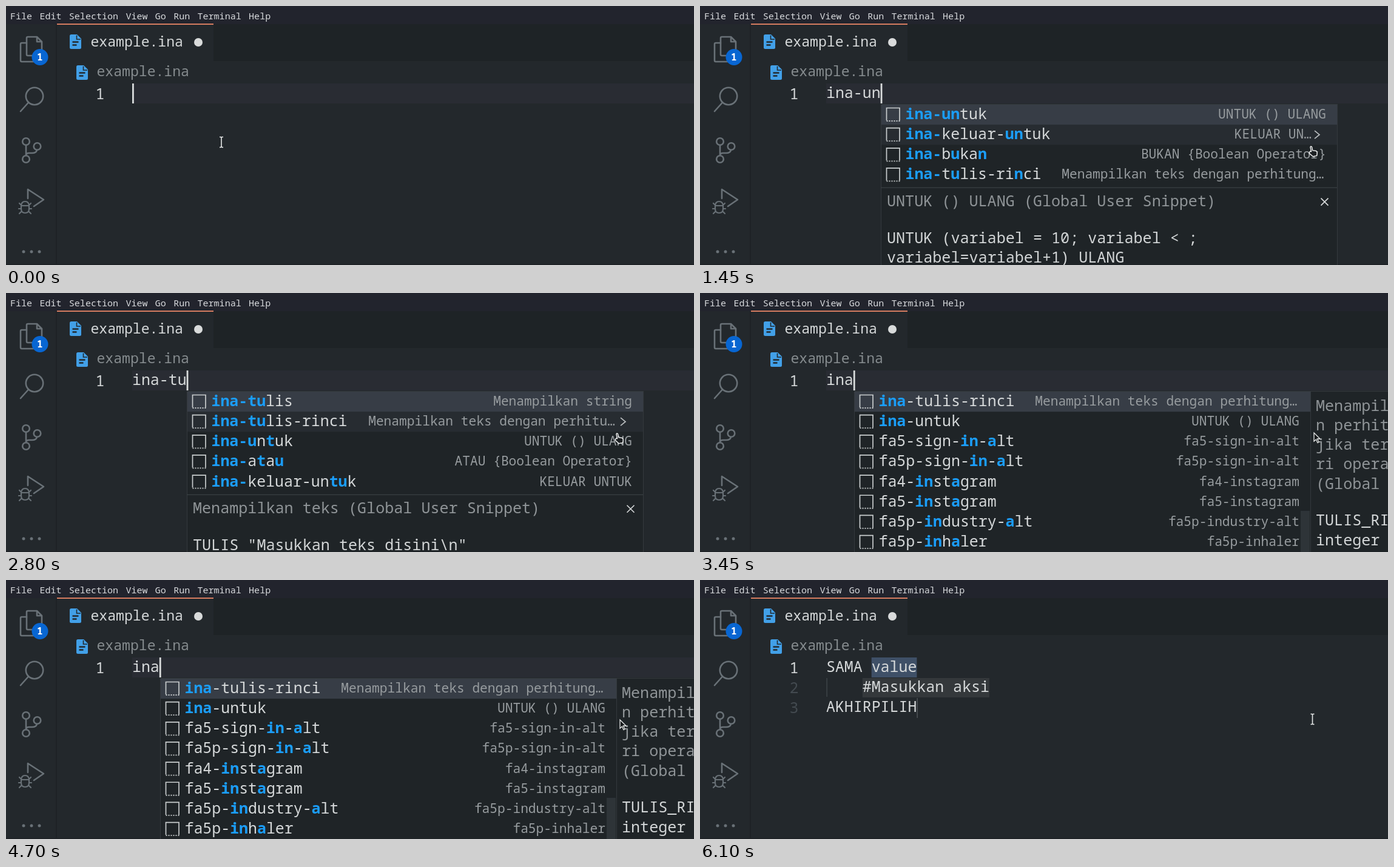
An HTML page that plays this animation: 1134 px wide and 428 px high, repeating every 6.15 s.

```html
<!DOCTYPE html>
<html lang="en">
<head>
<meta charset="utf-8">
<title>Snippet typing</title>
<style>
  html, body { margin: 0; width: 100%; height: 100%; overflow: hidden; background: #23282c; }
  svg { display: block; width: 1134px; height: 428px; }
  text { font-family: "Noto Sans Mono", "DejaVu Sans Mono", monospace; white-space: pre; fill: #d5d8d9; }
  .menu { font-size: 15.05px; fill: #d8dadd; }
  .tab { font-size: 23.1px; }
  .code, .label { font-size: 24.9px; }
  .detail { font-size: 21.2px; fill: #979c9f; }
  .head { font-size: 25.1px; fill: #8f9497; }
  .doc { font-size: 25.1px; fill: #d2d5d6; }
  .hit { font-weight: 700; fill: #1b9df8; }
  .icon { fill: none; stroke: #697177; stroke-width: 2.6; stroke-linejoin: round; stroke-linecap: round; }
  .scene { visibility: hidden; }
  .scene.on { visibility: visible; }
</style>
</head>
<body>
<svg viewBox="0 0 1134 428">
  <defs>
    <g id="file">
      <path d="M2.5 0H12L19 7V21.5Q19 24 16.5 24H2.5Q0 24 0 21.5V2.5Q0 0 2.5 0Z" fill="#42a0e8"/>
      <path d="M4.5 12.5H14.5M4.5 17.5H11.5" stroke="#23282c" stroke-width="2.4"/>
      <path d="M11.5 1.5V8H18" fill="none" stroke="#23282c" stroke-width="1.6"/>
    </g>
  </defs>

  <rect width="1134" height="428" fill="#23282c"/>
  <rect width="1134" height="30" fill="#22242d"/>
  <rect x="342" y="30" width="792" height="61" fill="#1e2326"/>
  <rect x="82" y="30" width="2" height="398" fill="#1e2226"/>
  <rect y="426" width="1134" height="2" fill="#1e2226"/>
  <rect x="84" y="29" width="258" height="2" fill="#d67c60"/>
  <g id="menu"></g>

  <use href="#file" x="105" y="47"/>
  <text class="tab" x="139.5" y="67">example.ina</text>
  <circle cx="317" cy="60" r="7" fill="#d9dbdb"/>
  <use href="#file" x="116" y="98"/>
  <text class="tab" x="149.5" y="116" style="fill:#858b8e">example.ina</text>

  <g class="icon">
    <path d="M34 61H26Q24 61 24 63V90Q24 92 26 92H46Q48 92 48 90V82"/>
    <path d="M36 51H51L59 59V80Q59 82 57 82H36Q34 82 34 80V53Q34 51 36 51ZM51 51V59H59"/>
    <circle cx="47" cy="149" r="14.2"/><path d="M37 159.5L24 174"/>
    <circle cx="33" cy="224" r="5.8"/><circle cx="51.5" cy="232" r="5.8"/><circle cx="33" cy="253" r="5.8"/>
    <path d="M33 230V247M51 238Q50 243 43 243H38Q33 243 33 247"/>
    <path d="M36 318V303L62 320L46 331"/>
    <path d="M25 331Q25 323 31.5 323T38 331V335Q38 342 31.5 342T25 335ZM25 330H38M22 326L25 329M41 326L38 329M21 335H25M38 335H42M22 343L26 339M41 343L37 339" stroke-width="2.2"/>
  </g>
  <g fill="#697177"><circle cx="29" cy="406" r="2.5"/><circle cx="42" cy="406" r="2.5"/><circle cx="55" cy="406" r="2.5"/></g>
  <circle cx="56" cy="84.5" r="13.5" fill="#0866d2"/>
  <text x="51" y="90" style="font-size:16px;font-weight:700;fill:#fff">1</text>

  <text class="code" x="147.5" y="154">1</text>
  <g id="scenes"></g>
  <g id="mouse">
    <path id="ibeam" d="M-3 -8.5H-1L0 -7.5L1 -8.5H3M0 -7.5V7.5M-3 8.5H-1L0 7.5L1 8.5H3" fill="none" stroke="#e8eaea" stroke-width="1.6"/>
    <path id="hand" d="M-3.5 2.5Q-2 .5 -1 3V-5Q0 -7 1.5 -5V1L7 3Q8.5 4 8 7L6.5 11H0L-4.5 5Q-5 3 -3.5 2.5Z" transform="translate(-1.5 8) rotate(-12)" fill="#1c2023" stroke="#f0f1f1" stroke-width="1.5"/>
    <path id="arrow" d="M2.5 1V15L6 12L8.5 17.5L10.5 16.5L8 11H12.5Z" fill="#15181a" stroke="#e8eaea" stroke-width="1.3"/>
  </g>
</svg>
<script>
const LOOP = 6150, CW = 14.94, X0 = 208, ROW = 33.15;
const $ = id => document.getElementById(id);
const esc = s => s.replace(/&/g, "&amp;").replace(/</g, "&lt;");
const text = (cls, x, y, s, extra = "") => `<text class="${cls}" x="${x}" y="${y}" ${extra}>${esc(s)}</text>`;
const rect = (x, y, w, h, fill) => `<rect x="${x}" y="${y}" width="${w}" height="${h}" fill="${fill}"/>`;
const frame = x => `<rect x="${x + .5}" y="162.5" width="752" height="280" fill="#1f2427" stroke="#34393d"/>`;
const caret = n => rect(col(n), 128, 2.8, 33, "#d9dcdc");
const col = n => X0 + n * CW;

let mx = 7;
$("menu").innerHTML = ["File", "Edit", "Selection", "View", "Go", "Run", "Terminal", "Help"].map(s => {
  const t = text("menu", mx, 22, s);
  mx += s.length * 9.05 + 12.2;
  return t;
}).join("");

// Asterisks enclose the characters that match the typed word.
const lists = {
  all: {
    rows: [
      ["*ina*-tulis-rinci", "Menampilkan teks dengan perhitung…"], ["*ina*-untuk", "UNTUK () ULANG"],
      ["fa5-sign-*in*-*a*lt", "fa5-sign-in-alt"], ["fa5p-sign-*in*-*a*lt", "fa5p-sign-in-alt"],
      ["fa4-*in*st*a*gram", "fa4-instagram"], ["fa5-*in*st*a*gram", "fa5-instagram"],
      ["fa5p-*in*dustry-*a*lt", "fa5p-industry-alt"], ["fa5p-*in*h*a*ler", "fa5p-inhaler"]
    ],
    side: ["Menampilkan teks", "n perhitungan", "jika terdapat", "ri operator", "(Global User", "", "TULIS_RINCI", "integer"]
  },
  untuk: {
    rows: [
      ["*ina-un*tuk", "UNTUK () ULANG"], ["*ina-*keluar-*un*tuk", "KELUAR UN…", 42],
      ["*ina-*b*u*ka*n*", "BUKAN {Boolean Operator}"],
      ["*ina-*t*u*lis-ri*n*ci", "Menampilkan teks dengan perhitung…"]
    ],
    head: "UNTUK () ULANG (Global User Snippet)",
    doc: ["UNTUK (variabel = 10; variabel < ;", "variabel=variabel+1) ULANG"]
  },
  tulis: {
    rows: [
      ["*ina-tu*lis", "Menampilkan string"], ["*ina-tu*lis-rinci", "Menampilkan teks dengan perhitu…", 46],
      ["*ina-u*n*t*uk", "UNTUK () ULANG"], ["*ina-*a*t*a*u*", "ATAU {Boolean Operator}"],
      ["*ina-*keluar-un*tu*k", "KELUAR UNTUK"]
    ],
    head: "Menampilkan teks (Global User Snippet)",
    doc: ['TULIS "Masukkan teks disini\\n"']
  },
  sama: {
    rows: [["*ina-sama*", "SAMA"]],
    head: "SAMA (Global User Snippet)",
    doc: ["SAMA value", "    #Masukkan aksi", "AKHIRPILIH"]
  }
};

function label(s, x, y, count) {
  const spans = s.split("*").map((part, i) => {
    if (i % 2 === 0) return esc(part);
    const hit = part.slice(0, count), rest = part.slice(hit.length);
    count -= hit.length;
    return `<tspan class="hit">${hit}</tspan>${rest}`;
  });
  return `<text class="label" x="${x}" y="${y}">${spans.join("")}</text>`;
}

function row([name, info, inset], x, y, right, count) {
  const ix = x + 9.5;
  const gap = inset || (info.endsWith("…") ? 21.5 : 18);
  let s = `<path d="M${ix} ${y + 26}V${y + 5.5}H${ix + 21.5}V${y + 26}" fill="none" stroke="#c9cdce" stroke-width="1.7"/>`;
  s += `<path d="M${ix} ${y + 27}h22" stroke="#c9cdce" stroke-width="1.8" stroke-dasharray="2 2"/>`;
  s += label(name, x + 40.5, y + 24, count);
  s += text("detail", right - gap, y + 23, info, 'text-anchor="end"');
  if (inset) s += `<path d="M${right - 37} ${y + 10}l8 6.5l-8 6.5" fill="none" stroke="#b9bdbf" stroke-width="1.7"/>`;
  return s;
}

function popup(list, typed, pick) {
  const x = Math.round(col(typed.length)) + (list.side ? 1 : 0), right = x + 752, top = 163;
  let s = frame(x);
  if (list.rows.some(r => r[2])) s += rect(x + 1, top + ROW, 751, ROW, "#272c31");
  s += rect(x + 1, top + pick * ROW, 751, ROW, "#373d46");
  list.rows.forEach((r, i) => s += row(r, x, top + i * ROW, right, typed.length));
  if (list.side) {
    s += rect(right - 16, 360, 15, 70, "#2e3438") + frame(right);
    list.side.forEach((line, i) => {
      const head = i < 5;
      s += text(head ? "head" : "doc", right + 9, (head ? 194.5 : 190.5) + i * 32.3, line);
    });
  } else {
    const y = top + list.rows.length * ROW + 5;
    s += rect(x, y - 1, 752, 1.2, "#3a4044") + text("head", x + 10, y + 30, list.head);
    s += `<path d="M${right - 26.5} ${y + 17}l12 12m0 -12l-12 12" stroke="#d5d8d9" stroke-width="1.7"/>`;
    list.doc.forEach((line, i) => s += text("doc", x + 10, y + 91 + i * 32, line));
  }
  return s;
}

function typing(word, list, pick = 0) {
  return rect(X0, 128, 926, 33, "#292c33") + text("code", X0, 152, word) +
    caret(word.length) + (list ? popup(lists[list], word, pick) : "");
}

function snippet(lines, from, to, hasCaret = true) {
  let s = rect(col(from), 128, (to - from) * CW, 33, "#3f5067");
  lines.forEach((line, i) => {
    const y = 152 + i * ROW;
    if (i) s += text("code", 147.5, y + 2, String(i + 1), 'style="fill:#434a50"');
    if (line[0] === " ") {
      const pad = line.search(/\S/);
      s += rect(col(pad), 162, (line.length - pad) * CW, 32, "#34383b") + rect(X0 + .5, 162, 1.2, 31, "#454b4f");
    }
    s += text("code", X0, y, line);
  });
  if (lines.length > 1) s += rect(col(lines[2].length), 195, 1.5, 33, "#4e5357");
  return s + (hasCaret ? caret(to) : "");
}

// [start in ms, drawing, pointer]
const word = (t, w, list, pick) => [t, typing(w, list, pick), !list ? "ibeam" : list === "all" ? "arrow" : "hand"];
const done = (t, ...args) => [t, snippet(...args), "ibeam"];
const body = "    #Masukkan aksi";
const scenes = [
  word(0, ""), word(800, "i"), word(900, "in"), word(1000, "ina", "all"),
  word(1150, "ina-", "untuk"), word(1300, "ina-u", "untuk"), word(1400, "ina-un", "untuk"),
  done(1750, ["UNTUK (variabel = 10; variabel < ; variabel=variabel+1) ULANG", body, "AKHIRULANG"], 7, 15),
  word(2000, ""), word(2150, "i"), word(2250, "in"), word(2350, "ina", "all"),
  word(2500, "ina-", "tulis"), word(2600, "ina-t", "tulis"), word(2700, "ina-tu", "tulis"),
  done(3000, ['TULIS "Masukkan teks disini\\n"'], 7, 27),
  word(3250, ""), word(3300, "i"), word(3350, "in"), word(3400, "ina", "all"),
  word(3500, "ina-", "tulis"), word(3550, "ina-t", "tulis"), word(3600, "ina-tu", "tulis"), word(3700, "ina-tu", "tulis", 1),
  done(3800, ["TULIS_RINCI variabel integer"], 12, 28),
  word(4450, ""), word(4600, "i"), word(4650, "in"), word(4700, "ina", "all"),
  word(5250, "ina-", "sama"), word(5400, "ina-s", "sama"), word(5500, "ina-sa", "sama"),
  word(5600, "ina-sam", "sama"), word(5700, "ina-sama", "sama"),
  done(5950, ["SAMA value", body, "AKHIRPILIH"], 5, 10, false)
];
$("scenes").innerHTML = scenes.map(s => `<g class="scene">${s[1]}</g>`).join("");
const groups = [...$("scenes").children];
const pointers = ["ibeam", "hand", "arrow"];

function draw(t) {
  let n = scenes.length - 1;
  while (scenes[n][0] > t) n--;
  groups.forEach((g, i) => g.classList.toggle("on", i === n));
  const p = Math.min(1, Math.max(0, (t - 150) / 600)), e = p * p * (3 - 2 * p);
  $("mouse").setAttribute("transform", `translate(${355 + 654.5 * e} ${225 + 5 * e})`);
  pointers.forEach(id => $(id).style.display = id === scenes[n][2] ? "" : "none");
}

const start = performance.now();
function tick() {
  draw((performance.now() - start) % LOOP);
  requestAnimationFrame(tick);
}
draw(0);
requestAnimationFrame(tick);
</script>
</body>
</html>
```
